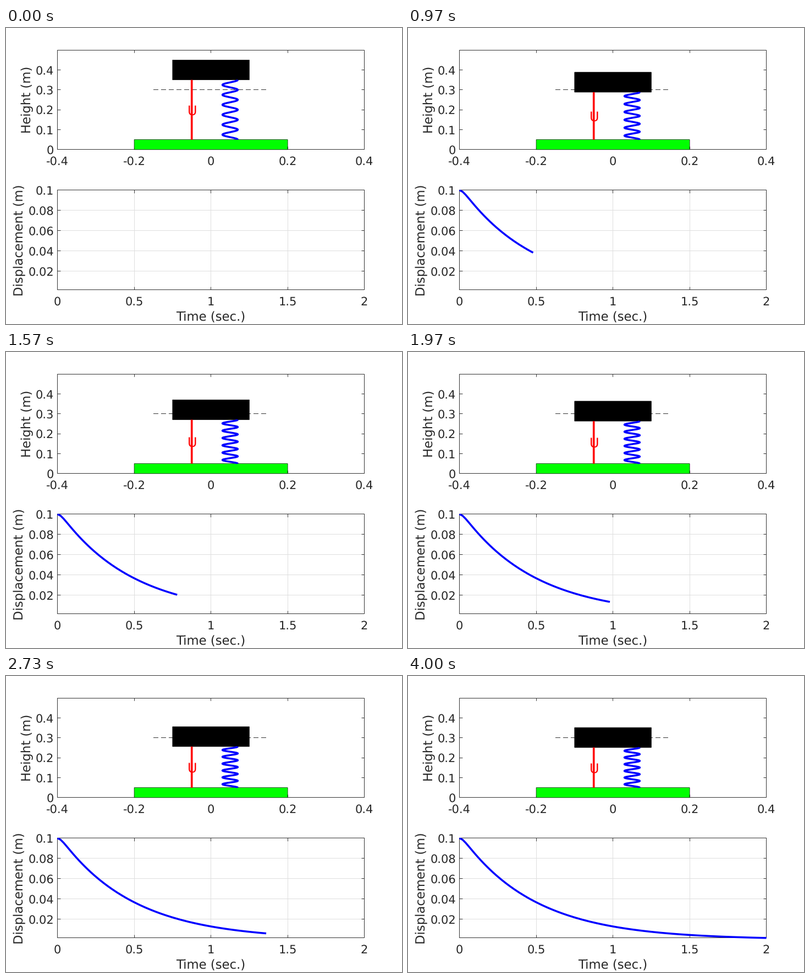
A matplotlib script that plays this animation: 720x540 px, repeating every 4.03 s.

```python
import numpy as np
import matplotlib.pyplot as plt
from matplotlib.animation import FuncAnimation
from matplotlib.collections import LineCollection
from matplotlib.patches import Rectangle

plt.rcParams.update({"font.family": "DejaVu Sans", "path.snap": False,
                     "text.hinting": "none"})

W, H, DPI = 720, 540, 100
PX = 72 / DPI                      # points per pixel
INK = "0.2"
LEFT, RIGHT = 93.6, 651.6
TOP1, BOT1 = 40.15, 221.85         # mechanism panel
TOP2, BOT2 = 295.9, 477.9          # displacement panel

# Overdamped response: y'' + 50 y' + 100 y = 0, y(0) = 0.1, y'(0) = 0
C, K, Y0 = 50, 100, 0.1
ROOT = np.sqrt(C * C - 4 * K)
S1, S2 = (C - ROOT) / 2, (C + ROOT) / 2
t = np.linspace(0, 2, 101)
y = Y0 * (S2 * np.exp(-S1 * t) - S1 * np.exp(-S2 * t)) / (S2 - S1)

BASE, REST, BLOCK, TURNS = 0.05, 0.25, 0.1, 6


def sx(x):
    return (LEFT + RIGHT) / 2 + x * (RIGHT - LEFT) / 0.8


def sy(h):
    return BOT1 - h * (BOT1 - TOP1) / 0.5


def px(time):
    return LEFT + time * (RIGHT - LEFT) / 2


def py(d):
    return BOT2 - (d - y[-1]) / (Y0 - y[-1]) * (BOT2 - TOP2)


def mid(v):
    """Centre of the pixel holding v, for crisp hairlines."""
    return np.floor(v) + 0.5


fig = plt.figure(figsize=(W / DPI, H / DPI), dpi=DPI, facecolor="white")
ax = fig.add_axes([0, 0, 1, 1])
ax.set(xlim=(0, W), ylim=(H, 0))
ax.axis("off")


def hairlines(segments, color, z):
    ax.add_collection(LineCollection(mid(np.array(segments)), colors=color,
                                     linewidths=PX, zorder=z), autolim=False)


def label(x, base, s, size=21, **kw):
    kw = {"ha": "center", "va": "baseline", "color": "0.15", **kw}
    return ax.text(x, base, s, fontsize=size * PX, **kw)


def panel(top, bot, xticks, yticks, grid=False, size=5.6):
    """Box with inward ticks on all sides; ticks are (position, text) pairs."""
    corners = [(LEFT, top), (RIGHT, top), (RIGHT, bot), (LEFT, bot)]
    box = [[a, b] for a, b in zip(corners, corners[1:] + corners[:1])]
    ticks, lines = [], []
    for x, s in xticks:
        label(x, bot + 28.2, s)
        ticks += [[(x, bot), (x, bot - size)], [(x, top), (x, top + size)]]
        lines.append([(x, top), (x, bot)])
    for v, s in yticks:
        label(87, v + 7.8, s, ha="right")
        ticks += [[(LEFT, v), (LEFT + size, v)], [(RIGHT, v), (RIGHT - size, v)]]
        lines.append([(LEFT, v), (RIGHT, v)])
    if grid:
        hairlines(lines, "0.87", 0)
    hairlines(box + ticks, INK, 1)


panel(TOP1, BOT1,
      [(sx(v), f"{v:g}") for v in (-0.4, -0.2, 0, 0.2, 0.4)],
      [(sy(v), f"{v:g}") for v in (0, 0.1, 0.2, 0.3, 0.4)])
panel(TOP2, BOT2,
      [(px(v), f"{v:g}") for v in (0, 0.5, 1, 1.5, 2)],
      [(py(v), f"{v:g}") for v in (0.02, 0.04, 0.06, 0.08, 0.1)], grid=True)

upright = dict(rotation=90, rotation_mode="anchor")
label(45, 131, "Height (m)", 22.7, **upright)
label(31, 387, "Displacement (m)", 22.7, **upright)
label(sx(0), 533.5, "Time (sec.)", 22.7)

# Mechanism
edge = dict(ec="black", lw=0.67 * PX, zorder=3)
stroke = dict(solid_capstyle="butt", solid_joinstyle="round", zorder=4)
ax.plot([sx(-0.15), sx(0.15)], [mid(sy(0.3))] * 2, color=INK, lw=PX,
        ls=(0, (9, 5)), zorder=2)
ax.add_patch(Rectangle((sx(-0.2), sy(BASE)), sx(0.2) - sx(-0.2), sy(0) - sy(BASE),
                       fc="lime", **edge))
block = ax.add_patch(Rectangle((sx(-0.1), 0), sx(0.1) - sx(-0.1), sy(0) - sy(BLOCK),
                               fc="black", **edge))
rod, = ax.plot([], [], color="red", lw=3.6 * PX, **stroke)
cup = label(sx(-0.05) + 0.5, 0, "U", 24, color="red", zorder=5)
spring, = ax.plot([], [], color="blue", lw=3.5 * PX, **stroke)
curve, = ax.plot([], [], color="blue", lw=3.5 * PX, **stroke)
curve.set_clip_path(Rectangle((mid(LEFT) - 0.5, mid(TOP2) - 0.5), RIGHT - LEFT + 1,
                              BOT2 - TOP2 + 3, transform=ax.transData))

u = np.linspace(0, 1, 241)
coil_x = sx(0.05 + 0.02 * np.cos(2 * np.pi * TURNS * u))


def update(i):
    # 10 ms ticks -> 30 fps display -> 25 fps simulation steps
    shown = (6 * i + 3) // 20
    k = (5 * shown + 2) // 6
    low = REST + y[k]
    block.set_y(sy(low + BLOCK))
    rod.set_data([sx(-0.05)] * 2, [sy(BASE), sy(low)])
    cup.set_y(sy((BASE + low) / 2) + 9.2)
    spring.set_data(coil_x, sy(BASE + (low - BASE) * u))
    n = k + 1 if k else 0
    curve.set_data(px(t[:n]), py(y[:n]))
    return block, rod, cup, spring, curve


anim = FuncAnimation(fig, update, frames=403, interval=10, repeat=True,
                     repeat_delay=0, blit=False)
plt.show()
```
